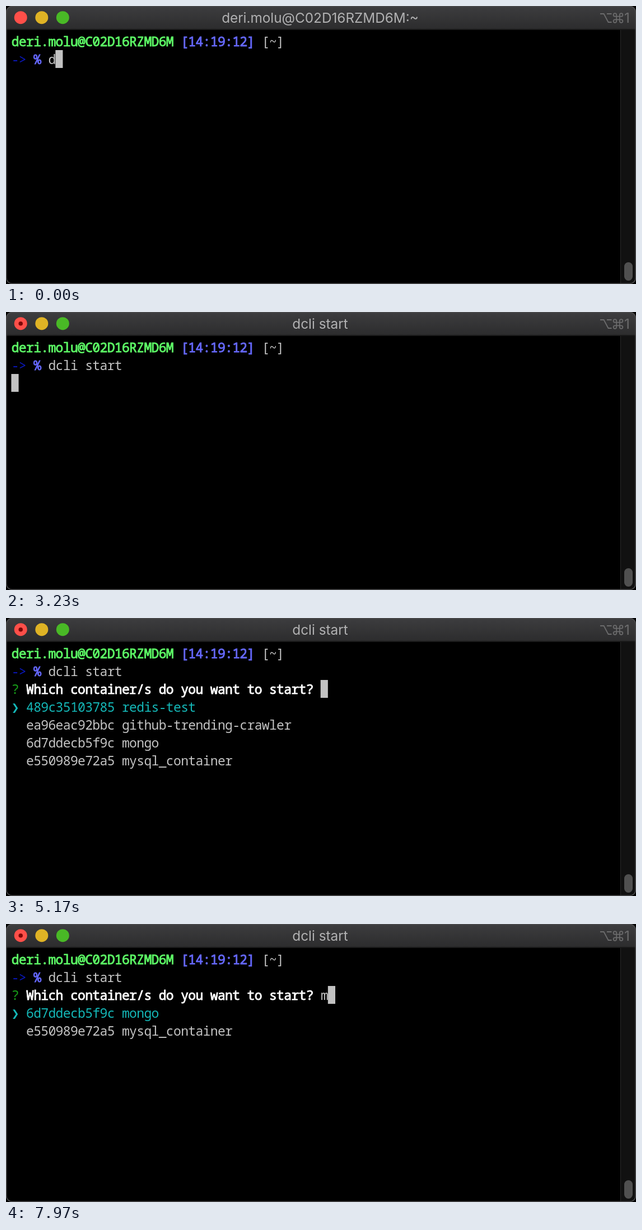
An HTML page with a canvas that plays this animation: 1125 by 498 pixels, repeating every 8 s.

```html
<!DOCTYPE html>
<html lang="en">
<head>
<meta charset="utf-8">
<title>Terminal</title>
<style>
html, body { margin: 0; width: 100%; height: 100%; overflow: hidden; background: #000; }
canvas { display: block; }
</style>
</head>
<body>
<canvas id="stage" width="1125" height="498"></canvas>
<script>
const ctx = document.getElementById('stage').getContext('2d');
const LOOP = 8000, COL = 13.15, ROW = 32, SIZE = 23;
const MONO = SIZE + 'px "Noto Sans Mono", "DejaVu Sans Mono", monospace';
const SANS = '24.3px Inter, "Open Sans", sans-serif';
const USER = 'deri.molu@C02D16RZMD6M';
const GRAY = '#c4c4c4', BLUE = '#6669ff', TEAL = '#14b8b8';
const COMMAND = 'dcli start';
const ENTER = 870, BUSY = 1250, PROMPT = 3270;
const ITEMS = [
  '489c35103785 redis-test',
  'ea96eac92bbc github-trending-crawler',
  '6d7ddecb5f9c mongo',
  'e550989e72a5 mysql_container'
];
// Search box content from each time on; null shows the hint
const QUERIES = [
  [PROMPT, null], [4400, 'm'], [4720, 'mo'], [5060, 'm'], [5130, ''],
  [5520, 'r'], [5680, 're'], [6080, 'r'], [6200, ''], [7800, 'm']
];

// Bold is the regular face thickened by an outline
function write(text, col, row, color, bold = false) {
  const x = 9.7 + col * COL, y = 72 + row * ROW;
  ctx.font = MONO;
  ctx.letterSpacing = COL - SIZE * .6 + 'px';
  ctx.fillStyle = ctx.strokeStyle = color;
  ctx.fillText(text, x, y);
  if (bold) {
    ctx.lineWidth = .9;
    ctx.strokeText(text, x, y);
  }
  ctx.letterSpacing = '0px';
}

function cursor(col, row) {
  ctx.fillStyle = '#c2c2c2';
  ctx.fillRect(9.4 + col * COL, 47 + row * ROW, 13.15, ROW);
}

function disc(x, y, r, color) {
  ctx.fillStyle = color;
  ctx.beginPath();
  ctx.arc(x, y, r, 0, 7);
  ctx.fill();
}

function box(x, y, w, h, r) {
  ctx.beginPath();
  ctx.roundRect(x, y, w, h, r);
}

const optionKey = new Path2D('M1061 14h6.5l8 15h6M1073 14h8.5');
const commandKey = new Path2D('M-3-6a3 3 0 1 0-3 3h12a3 3 0 1 0-3-3v12a3 3 0 1 0 3-3h-12a3 3 0 1 0 3 3z');

function shortcut() {
  ctx.strokeStyle = ctx.fillStyle = '#6c6c6d';
  ctx.lineWidth = 1.8;
  ctx.stroke(optionKey);
  ctx.save();
  ctx.translate(1093, 21.5);
  ctx.scale(.93, .93);
  ctx.stroke(commandKey);
  ctx.restore();
  ctx.textAlign = 'right';
  ctx.fillText('1', 1114, 30);
}

function drawWindow(t) {
  ctx.fillStyle = '#000';
  ctx.fillRect(0, 0, 1125, 498);

  ctx.save();
  box(0, 0, 1125, 498, 10);
  ctx.clip();
  const bar = ctx.createLinearGradient(0, 0, 0, 42);
  bar.addColorStop(0, '#3d3d3f');
  bar.addColorStop(1, '#2c2c2d');
  ctx.fillStyle = bar;
  ctx.fillRect(0, 0, 1125, 42);
  ctx.fillStyle = '#1a1a1a';
  ctx.fillRect(0, 41, 1125, 2);
  ctx.fillStyle = '#111';
  ctx.fillRect(1097, 43, 28, 455);
  ctx.fillStyle = '#292929';
  ctx.fillRect(1097, 43, 1, 455);
  ctx.restore();

  box(1104, 459, 15, 33, 7.5);
  ctx.fillStyle = '#505050';
  ctx.fill();
  box(.75, .75, 1123.5, 496.5, 10);
  ctx.strokeStyle = '#4b4b4c';
  ctx.lineWidth = 1.5;
  ctx.stroke();

  disc(26.2, 20.7, 11.5, '#ff4f49');
  disc(63.8, 20.7, 11.5, '#dfb325');
  disc(101.3, 20.7, 11.5, '#49b926');
  if (t >= BUSY) disc(26.2, 20.7, 3.8, '#7c0706');

  ctx.font = SANS;
  ctx.fillStyle = '#b1b1b2';
  ctx.textAlign = 'center';
  ctx.fillText(t < ENTER ? USER + ':~' : COMMAND, 561, 30);
  shortcut();
  ctx.textAlign = 'left';
}

function drawPrompt(t) {
  const query = QUERIES.filter(([start]) => start <= t).pop()[1];
  const tail = query ?? '(Use arrow keys or type to search)';
  write('?', 0, 2, '#18a51a');
  write('Which container/s do you want to start?', 2, 2, '#fff', true);
  write(tail, 42, 2, query === null ? '#646464' : GRAY);
  cursor(42 + tail.length, 2);
  ITEMS.filter(item => item.includes(query ?? '')).forEach((item, i) => {
    if (i === 0) write('❯', 0, 3, TEAL);
    write(item, 2, 3 + i, i ? GRAY : TEAL);
  });
}

function draw(t) {
  drawWindow(t);
  write(USER, 0, 0, '#5dfa66', true);
  write('[14:19:12]', 23, 0, BLUE, true);
  write('[~]', 34, 0, GRAY);
  write('->', 0, 1, '#0a18c0');
  write('%', 3, 1, BLUE, true);

  const typed = Math.min(COMMAND.length, 1 + Math.max(0, Math.floor((t - 10) / 80)));
  write(COMMAND.slice(0, typed), 5, 1, GRAY);
  if (t < ENTER) cursor(5 + typed, 1);
  else if (t < PROMPT) cursor(0, 2);
  else drawPrompt(t);
}

const begin = performance.now();
function tick() {
  draw((performance.now() - begin) % LOOP);
  requestAnimationFrame(tick);
}
tick();
</script>
</body>
</html>
```
